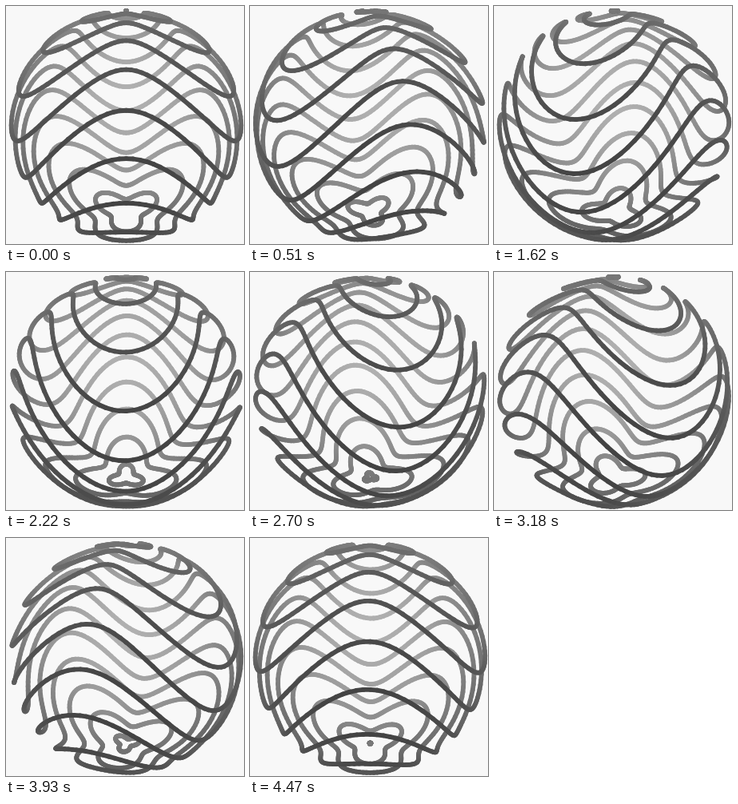
Animation, 298 px wide and 298 px high, one loop 4.5 s. Source, as an HTML page with a canvas:

```html
<!DOCTYPE html>
<html lang="en">
<head>
<meta charset="utf-8">
<title>Wavy sphere</title>
<style>
  html, body { margin: 0; width: 100%; height: 100%; overflow: hidden; background: #f8f8f8; }
  canvas { display: block; width: 298px; height: 298px; }
</style>
</head>
<body>
<canvas id="stage"></canvas>
<script>
const SIZE = 298, CENTER_X = 150.5, CENTER_Y = 150;
const LOOP = 4500, STEP = 30;
const RINGS = 11, SEGMENTS = 150, LOBES = 3;
const WAVE = 20 * Math.PI / 180;
const TILT = 22.8 * Math.PI / 180;
const CAMERA = 2.65, FOCAL = 353;
const NEAR_GREY = 67, FAR_GREY = 176;
const LINE = 5.8;

const canvas = document.getElementById('stage');
const ctx = canvas.getContext('2d');
const ratio = window.devicePixelRatio || 1;
canvas.width = canvas.height = SIZE * ratio;
ctx.scale(ratio, ratio);
ctx.lineCap = 'round';
ctx.lineWidth = LINE;

// Tilt toward the viewer, then perspective.
function project(colat, lon) {
  const r = Math.sin(colat), up = Math.cos(colat);
  const x = r * Math.sin(lon), front = r * Math.cos(lon);
  const depth = front * Math.cos(TILT) + up * Math.sin(TILT);
  const y = up * Math.cos(TILT) - front * Math.sin(TILT);
  const scale = FOCAL / (CAMERA - depth);
  return { x: CENTER_X + x * scale, y: CENTER_Y - y * scale, depth, front };
}

function ringPoints(base, spin) {
  return Array.from({ length: SEGMENTS + 1 }, (_, i) => {
    const lon = i / SEGMENTS * 2 * Math.PI;
    const wave = WAVE * Math.sin(base) * Math.cos(LOBES * (lon - spin));
    return project(base - wave, lon);
  });
}

function draw(t) {
  const shift = (t * 3) % 1;
  const spin = t * 2 * Math.PI / LOBES;
  const segments = [];
  for (let k = 0; k < RINGS; k++) {
    // A tiny minimum keeps the ring at the pole visible as a dot.
    const base = Math.max(0.002, Math.PI * (k + shift) / RINGS);
    const pts = ringPoints(base, spin);
    for (let i = 0; i < SEGMENTS; i++) {
      segments.push({ a: pts[i], b: pts[i + 1], depth: pts[i].depth + pts[i + 1].depth });
    }
  }
  segments.sort((p, q) => p.depth - q.depth);

  ctx.fillStyle = '#f8f8f8';
  ctx.fillRect(0, 0, SIZE, SIZE);
  for (const { a, b } of segments) {
    const mix = (1 - (a.front + b.front) / 2) / 2;
    const grey = Math.round(NEAR_GREY + (FAR_GREY - NEAR_GREY) * mix);
    ctx.strokeStyle = `rgb(${grey},${grey},${grey})`;
    ctx.beginPath();
    ctx.moveTo(a.x, a.y);
    ctx.lineTo(b.x, b.y);
    ctx.stroke();
  }
}

const start = performance.now();
function frame() {
  const elapsed = (performance.now() - start) % LOOP;
  draw(Math.floor(elapsed / STEP) * STEP / LOOP);
  requestAnimationFrame(frame);
}
frame();
</script>
</body>
</html>
```
